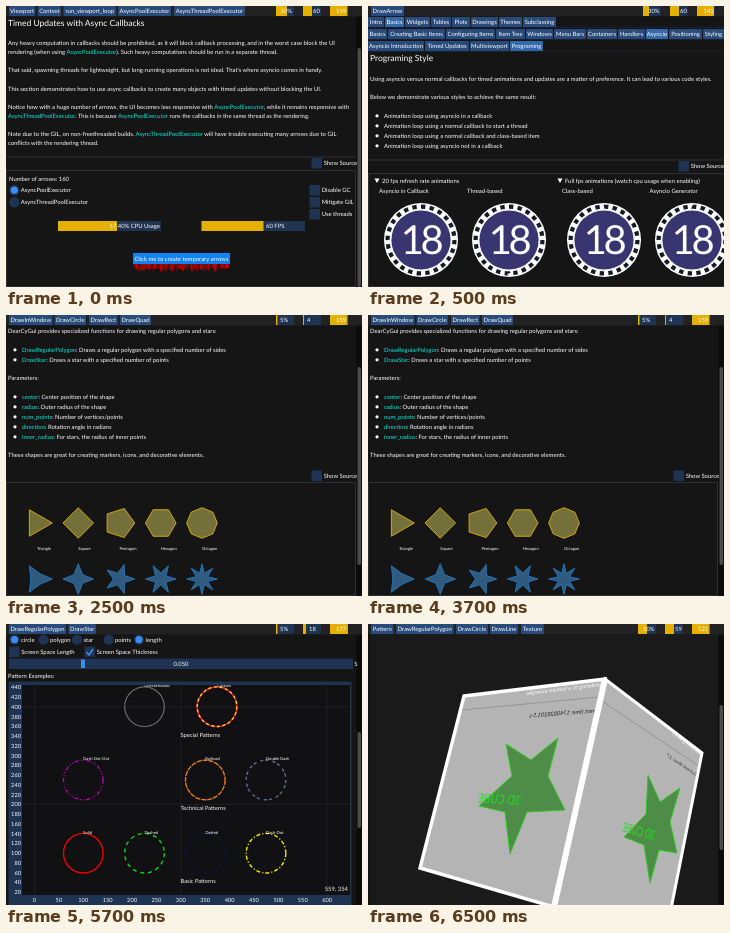
Write an HTML page that moves like this. It is 356 px wide and 281 px high and loops after 8 s.

```html
<!DOCTYPE html>
<html lang="en">
<head>
<meta charset="utf-8">
<title>Toolkit demo tour</title>
<style>
html, body { margin: 0; width: 100%; height: 100%; overflow: hidden; background: #151515; }
svg { display: block; width: 356px; height: 281px; }
text { font-family: Lato, "Open Sans", sans-serif; fill: #fff; white-space: pre; text-rendering: geometricPrecision; }
tspan { fill: #00eadf; }
</style>
</head>
<body>
<svg id="stage" viewBox="0 0 356 281"></svg>
<script>
const NAVY = '#1f3352', TAB = '#294b7b', ACTIVE = '#3369ad', BLUE = '#3b8cf0', GOLD = '#e6b000';
const BODY = 5.9, TITLE = 8.5;

// Shapes
const rect = (x, y, w, h, fill, more = '') =>
  `<rect x="${x}" y="${y}" width="${w}" height="${h}" fill="${fill}" ${more}/>`;
const disc = (x, y, r, fill, more = '') =>
  `<circle cx="${x}" cy="${y}" r="${r}" fill="${fill}" ${more}/>`;
const line = (x1, y1, x2, y2, color, width = 1) =>
  `<path d="M${x1} ${y1}L${x2} ${y2}" stroke="${color}" stroke-width="${width}"/>`;
const poly = (points, fill, stroke = 'none', width = 1) =>
  `<polygon points="${points}" fill="${fill}" stroke="${stroke}" stroke-width="${width}"/>`;

// Text is placed by its vertical middle; [brackets] mark highlighted words.
const text = (x, y, s, size = BODY, more = '') =>
  `<text x="${x}" y="${y + size * .35}" font-size="${size}" ${more}>${s.replace(/\[(.+?)\]/g, '<tspan>$1</tspan>')}</text>`;
const middle = 'text-anchor="middle"', right = 'text-anchor="end"';

// Widgets
const tab = (x, end, y, s, on) =>
  rect(x, y, end - x, 10, on ? ACTIVE : TAB, 'rx="1"') + text((x + end) / 2, y + 5, s, BODY, middle);
const tabRow = (y, tabs, active) =>
  tabs.map(([x, end, s]) => tab(x, end, y, s, s === active)).join('') + line(0, y + 10.3, 356, y + 10.3, NAVY, .5);
const bar = (x, y, w, h, fill, s, textX) =>
  rect(x, y, w, h, NAVY) + rect(x, y, fill, h, GOLD) + text(textX, y + h / 2, s);
const header = (tabs, meters, x = 270) =>
  rect(0, 0, 356, 10.5, '#222') + tabs.map(([a, b, s]) => tab(a, b, 0, s)).join('') +
  meters.map(([fill, s, dx], i) => bar(x + i * 27, 0, 18, 10, fill, s, x + i * 27 + dx)).join('');
const scrollbar = (y, end) =>
  rect(350.5, 10.5, 5, 271, '#0b0b0b') + rect(351.5, y, 3.5, end - y, '#4c4c4c', 'rx="1.7"');
const check = (x, y, s, on) =>
  rect(x, y, 10.5, 10.5, NAVY) + text(x + 12.2, y + 5.3, s) +
  (on ? `<path d="M${x + 2} ${y + 5.5}l2.5 3l4-6" fill="none" stroke="${BLUE}" stroke-width="1.5"/>` : '');
const radio = (x, y, s, on) =>
  disc(x, y, 5.2, NAVY) + (on ? disc(x, y, 3.6, BLUE) : '') + text(x + 6.5, y, s);
const bullet = (y, s) => disc(9, y, 1.6, '#fff') + text(16, y, s);
const fold = (x, y, s) => poly(`${x},${y - 2} ${x + 5},${y - 2} ${x + 2.5},${y + 2.5}`, '#fff') + text(x + 7.5, y, s);
const panel = (y, w = 349) => rect(.5, y + .5, w, 280 - y, 'none', 'stroke="#36363b" stroke-width=".8"');

function polar(cx, cy, n, radii) {
  return Array.from({ length: n }, (_, i) => {
    const a = 2 * Math.PI * i / n, r = radii[i % radii.length];
    return [(cx + r * Math.cos(a)).toFixed(2), (cy + r * Math.sin(a)).toFixed(2)].join();
  }).join(' ');
}

function callbacks() {
  let arrows = '', seed = 7;
  const rand = () => (seed = seed * 16807 % 2147483647) / 2147483647;
  for (let i = 0; i < 80; i++) {
    const x = 128 + i * 1.2, y = 261.5 + rand() * 4;
    arrows += line(x, 258, x + rand() - .5, y, `rgb(${130 + rand() * 120 | 0},0,0)`, .9);
  }
  return scrollbar(42, 281) +
    header([[3, 29, 'Viewport'], [32, 55, 'Context'], [57.5, 110, 'run_viewport_loop'],
      [112, 165, 'AsyncPoolExecutor'], [168, 239, 'AsyncThreadPoolExecutor']],
      [[11, '50%', 4.5], [9, '60', 10], [17.5, '159', 6]]) +
    text(2, 16.6, 'Timed Updates with Async Callbacks', TITLE) +
    text(2, 36.8, 'Any heavy computation in callbacks should be prohibited, as it will block callback processing, and in the worst case block the UI') +
    text(2, 46, 'rendering (when using [AsyncPoolExecutor]). Such heavy computations should be run in a separate thread.') +
    text(2, 64.3, "That said, spawning threads for lightweight, but long-running operations is not ideal. That's where asyncio comes in handy.") +
    text(2, 82.6, 'This section demonstrates how to use async callbacks to create many objects with timed updates without blocking the UI.') +
    text(2, 100.8, 'Notice how with a huge number of arrows, the UI becomes less responsive with [AsyncPoolExecutor], while it remains responsive with') +
    text(2, 110, '[AsyncThreadPoolExecutor]. This is because [AsyncPoolExecutor] runs the callbacks in the same thread as the rendering.') +
    text(2, 128.3, 'Note due to the GIL, on non-freethreaded builds, [AsyncThreadPoolExecutor] will have trouble executing many arrows due to GIL') +
    text(2, 137.4, 'conflicts with the rendering thread.') +
    line(0, 151, 350, 151, '#36363b', .8) + check(305.5, 152, 'Show Source') + panel(164) +
    text(3, 172.7, 'Number of arrows: 160') +
    radio(8.3, 184.2, 'AsyncPoolExecutor', true) + radio(8.3, 196.3, 'AsyncThreadPoolExecutor') +
    check(303.5, 179, 'Disable GC') + check(303.5, 191, 'Mitigate GIL') + check(303.5, 203, 'Use threads') +
    bar(52, 215, 103, 10, 59, '57.40% CPU Usage', 103.5) + bar(195.5, 215, 103.5, 10, 62, '60 FPS', 260) +
    arrows + rect(127, 247, 97, 11, '#1482f5') + text(175.3, 252.7, 'Click me to create temporary arrows', BODY, middle);
}

const dial = x =>
  disc(x, 234, 37, '#fff') +
  disc(x, 234, 33.4, 'none', 'stroke="#171a26" stroke-width="4.2" pathLength="48" stroke-dasharray="1 1"') +
  disc(x, 234, 29.6, '#393570') + text(x - .5, 234, '18', 40, middle + ' letter-spacing="-3.5"');

const styles = () =>
  header([[3, 36, 'DrawArrow']], [[6, '30%', 5], [9, '60', 10], [17, '141', 6.5]], 275) +
  tabRow(11, [[0, 16, 'Intro'], [17, 36, 'Basics'], [37, 62, 'Widgets'], [63, 83, 'Tables'], [84, 102, 'Plots'],
    [103, 130, 'Drawings'], [131, 154, 'Themes'], [155, 188, 'Subclassing']], 'Basics') +
  tabRow(23, [[0, 19, 'Basics'], [20, 77, 'Creating Basic Items'], [78, 127, 'Configuring Items'], [128, 157, 'Item Tree'],
    [158, 185, 'Windows'], [186, 218, 'Menu Bars'], [219, 249, 'Containers'], [250, 277, 'Handlers'],
    [278, 300, 'Asyncio'], [301, 334, 'Positioning'], [335, 356, 'Styling']], 'Asyncio') +
  tabRow(35, [[0, 56, 'Asyncio Introduction'], [57, 101, 'Timed Updates'], [102, 141, 'Multiviewport'],
    [142, 175, 'Programing']], 'Programing') +
  text(2, 52, 'Programing Style', TITLE) +
  text(2, 72.5, 'Using asyncio versus normal callbacks for timed animations and updates are a matter of preference. It can lead to various code styles.') +
  text(2, 91, 'Below we demonstrate various styles to achieve the same result:') +
  bullet(109.8, 'Animation loop using asyncio in a callback') +
  bullet(119.8, 'Animation loop using a normal callback to start a thread') +
  bullet(129.8, 'Animation loop using a normal callback and class-based item') +
  bullet(139.8, 'Animation loop using asyncio not in a callback') +
  line(0, 154, 356, 154, '#36363b', .8) + check(310.5, 155, 'Show Source') + panel(167, 360) +
  fold(6.5, 174.5, '20 fps refresh rate animations') +
  fold(189.5, 174.5, 'Full fps animations (watch cpu usage when enabling)') +
  text(11, 185, 'Asyncio in Callback') + text(99, 185, 'Thread-based') +
  text(194, 185, 'Class-based') + text(281.5, 185, 'Asyncio Generator') +
  [53, 141, 236, 324].map(dial).join('');

function polygons() {
  const names = ['Triangle', 'Square', 'Pentagon', 'Hexagon', 'Octagon'];
  const shapes = [3, 4, 5, 6, 8].map((n, i) => {
    const x = 31 + i * 41.25;
    return poly(polar(x, 208, n, [15.3]), '#74703a', '#d0a60c') +
      text(x, 233.5, names[i], 4.1) +
      poly(polar(x, 264, n * 2, [15.3, 6.1]), '#315b7e', '#2273b8');
  }).join('');
  return scrollbar(52, 250) +
    header([[3, 46.5, 'DrawInWindow'], [48.5, 80, 'DrawCircle'], [83, 111.5, 'DrawRect'], [114, 145, 'DrawQuad']],
      [[1.5, '5%', 4], [1, '4', 4], [17.5, '159', 6]]) +
    text(2, 16.2, 'DearCyGui provides specialized functions for drawing regular polygons and stars:') +
    bullet(34.8, '[DrawRegularPolygon]: Draws a regular polygon with a specified number of sides') +
    bullet(44.8, '[DrawStar]: Draws a star with a specified number of points') +
    text(2, 63, 'Parameters:') +
    bullet(81.8, '[center]: Center position of the shape') +
    bullet(91.8, '[radius]: Outer radius of the shape') +
    bullet(101.8, '[num_points]: Number of vertices/points') +
    bullet(111.8, '[direction]: Rotation angle in radians') +
    bullet(121.8, '[inner_radius]: For stars, the radius of inner points') +
    text(2, 140.2, 'These shapes are great for creating markers, icons, and decorative elements.') +
    check(305.5, 155.5, 'Show Source') + panel(167) + shapes;
}

function patterns() {
  const ring = (x, y, color, name, dash = '', width = 1.2) =>
    disc(x, y, 19.8, 'none', `stroke="${color}" stroke-width="${width}" stroke-dasharray="${dash}"`) +
    text(x, y - 21, name, 4.1);
  let axes = '';
  for (let v = 20; v <= 440; v += 20) axes += text(15, 268 - (v - 20) * .487, '' + v, 5.7, right);
  for (let v = 0; v <= 600; v += 50) axes += text(28.5 + v * .4877, 276, '' + v, 5.7, middle);
  const grid = [28.5, 174.8, 321].map(x => line(x, 61, x, 271, '#252527', .7)).join('') +
    [83, 180.3].map(y => line(16, y, 344, y, '#252527', .7)).join('');
  return scrollbar(108, 204) +
    header([[3, 60, 'DrawRegularPolygon'], [62.5, 90, 'DrawStar']], [[1.5, '5%', 4], [3, '18', 6], [18, '177', 6]]) +
    radio(8.5, 15.6, 'circle', true) + radio(37.5, 15.6, 'polygon') + radio(71, 15.6, 'star') +
    radio(102.5, 15.6, 'points') + radio(133, 15.6, 'length', true) +
    check(3, 22.5, 'Screen Space Length') + check(78.5, 22.5, 'Screen Space Thickness', true) +
    rect(3, 34.5, 344, 10.5, NAVY) + rect(75, 35.5, 4, 8.5, BLUE) + text(175, 39.8, '0.050', BODY, middle) + text(348.3, 39.8, 'S') +
    text(2, 51.7, 'Pattern Examples:') +
    rect(2.5, 57.5, 343, 224, NAVY) + rect(16, 61, 328, 210, '#111113') + axes +
    `<svg x="0" y="61" width="344" height="210" viewBox="0 61 344 210" style="width:344px;height:210px">` + grid +
    ring(138.5, 82.7, '#777', 'Checkerboard', '2 .3') +
    ring(211, 82.7, '#e01818', 'Custom', '', 1.6) + ring(211, 82.7, '#ffd52a', '', '3 2.6', 1.3) +
    ring(77.3, 156, '#c800c8', 'Dash-Dot-Dot', '4 2 1 2 1 2') +
    ring(199.3, 156, '#e87c20', 'Railroad', '5 1', 1.4) +
    ring(260, 156, '#5d7090', 'Double Dash', '3.2 2 3.2 4', 1.4) +
    ring(77.3, 229.2, '#f00000', 'Solid', '', 1.4) +
    ring(138.5, 229.2, '#00dc00', 'Dashed', '4 3.8', 1.4) +
    ring(199.5, 229.2, '#1010c8', 'Dotted', '1.2 4.8') +
    ring(260, 229.2, '#e8e800', 'Dash-Dot', '4 2 1.2 2', 1.4) +
    '</svg>' +
    text(174.5, 111, 'Special Patterns', 5.7) + text(174.5, 184.5, 'Technical Patterns', 5.7) +
    text(174.5, 257.5, 'Basic Patterns', 5.7) + text(342, 264.5, '559, 354', BODY, right);
}

function cube() {
  // Mirrored text: the matrix points the reading direction to the left.
  const mirrored = (m, s, size, fill) =>
    `<text transform="matrix(${m})" font-size="${size}" style="fill:${fill}">${s}</text>`;
  const left = '96,72 237,55 186,283 52,244', side = '237,55 334,129 302,290 186,284';
  const clock = 'Current time: 1740828201.5 s', top = 'Rendering to a texture example';
  return scrollbar(81, 226) + rect(3, 10.5, 347, 271, '#1a1a1a') +
    header([[3, 25.5, 'Pattern'], [28, 85.5, 'DrawRegularPolygon'], [88, 120, 'DrawCircle'], [122, 150, 'DrawLine'],
      [153, 176, 'Texture']], [[9, '50%', 5], [9, '59', 10], [17.5, '121', 6]]) +
    `<clipPath id="l"><polygon points="${left}"/></clipPath><clipPath id="s"><polygon points="${side}"/></clipPath>` +
    poly(left, '#b4b4b4') + poly(side, '#b4b4b4') +
    '<g clip-path="url(#l)">' + line(94, 86, 231, 73, '#8c8c8c', .8) +
    mirrored('-.92 .07 -.2 .97 235 88', clock, 6, '#222') + mirrored('-.94 .11 -.2 .97 236 62', top, 6, '#fff') +
    poly('138,120 163,136 190,114 180,152 197,186 159,188 142,230 137,188 111,182 144,152', '#4e8d48', '#36c426') +
    mirrored('-.78 -.05 -.2 .97 152 181', '3D CUBE', 13, '#20e020') + '</g>' +
    '<g clip-path="url(#s)">' + line(234, 77, 332, 143, '#8c8c8c', .8) +
    mirrored('-.83 -.56 -.2 .97 329 153', clock.slice(0, 16), 5, '#333') +
    mirrored('-.8 -.6 -.2 .97 332 131', top.slice(0, 16), 5, '#fff') +
    poly('280,151 292,178 312,164 302,198 309,229 291,226 282,259 276,221 256,213 278,190', '#4e8d48', '#36c426') +
    mirrored('-.58 -.16 -.2 .97 286 216', '3D CUBE', 13, '#20e020') + '</g>' +
    poly(left, 'none', '#fff', 3.4) + poly(side, 'none', '#fff', 3) + line(237, 55, 186, 283, '#fff', 6);
}

const scenes = [[0, callbacks], [500, styles], [2500, polygons], [4500, patterns], [6500, cube]];
const stage = document.getElementById('stage');
stage.innerHTML = scenes.map(([, draw]) => `<g>${draw()}</g>`).join('');
const groups = [...stage.children];

function frame() {
  const t = performance.now() % 8000;
  const now = scenes.findLastIndex(([start]) => t >= start);
  groups.forEach((g, i) => g.style.display = i === now ? '' : 'none');
  requestAnimationFrame(frame);
}
frame();
</script>
</body>
</html>
```
